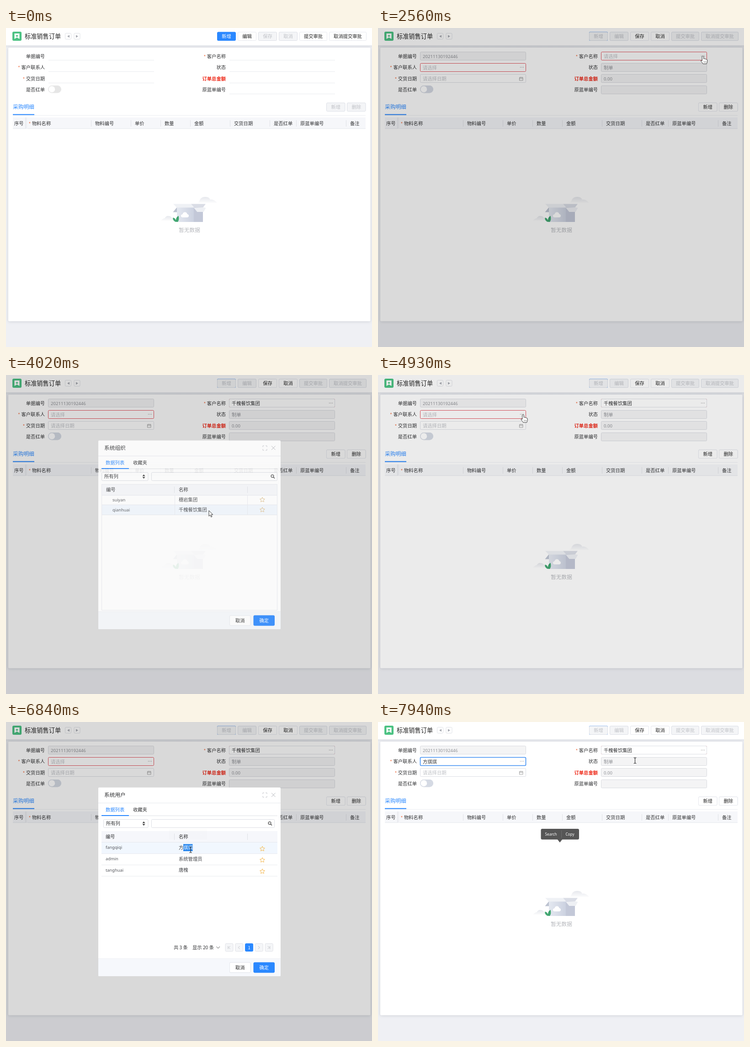
These frames come from a looping animation (801x699 px, 7990 ms). An HTML page:

```html
<!DOCTYPE html>
<html lang="zh-CN">
<head>
<meta charset="utf-8">
<style>
html, body { margin: 0; width: 100%; height: 100%; overflow: hidden; background: #eff0f4; }
svg { display: block; width: 801px; height: 699px; }
text { font-family: "Noto Sans CJK SC", "Noto Sans CJK", "Noto Sans", sans-serif; white-space: pre; }
text.latin { font-family: "Noto Sans", "Open Sans", sans-serif; }
.card { filter: drop-shadow(0 1px 3px rgba(40, 50, 70, .16)); }
</style>
</head>
<body>
<svg id="stage" viewBox="0 0 801 699" xmlns="http://www.w3.org/2000/svg"></svg>
<script>
const LOOP = 7990;
const BLUE = '#2a88ff', INK = '#303133', GREY = '#bfc1c6', LINE = '#e6e8ee', EDGE = '#dcdee4', RED = '#e2555f';
const ORG = '千槐餐饮集团', USER = '方琪琪';

// Drawing helpers
const box = (x, y, w, h, fill, stroke = 'none', r = 0, sw = 1) =>
  `<rect x="${x}" y="${y}" width="${w}" height="${h}" rx="${r}" fill="${fill}" stroke="${stroke}" stroke-width="${sw}"/>`;
const shape = (d, fill, stroke = 'none', sw = 1) =>
  `<path d="${d}" fill="${fill}" stroke="${stroke}" stroke-width="${sw}"/>`;
const line = (d, color, sw = 1) => shape(d, 'none', color, sw);
const text = (x, cy, s, { size = 10.3, fill = INK, anchor = 'start', weight = 400, latin = false } = {}) =>
  `<text x="${x}" y="${cy + size * .37}" font-size="${size}" fill="${fill}" text-anchor="${anchor}" font-weight="${weight}"${latin ? ' class="latin"' : ''}>${s}</text>`;
const group = (id, body, shown = true) => `<g id="${id}" opacity="${shown ? 1 : 0}">${body}</g>`;

const BUTTON = {
  normal: ['#fff', LINE, '#222'],
  off: ['#f4f5f7', '#dcdfe6', GREY],
  primary: [BLUE, BLUE, '#fff']
};
function button(x, y, w, h, label, kind) {
  const [bg, edge, ink] = BUTTON[kind];
  return box(x + .5, y + .5, w - 1, h - 1, bg, edge, 2) +
    text(x + w / 2, y + h / 2, label, { fill: ink, anchor: 'middle' });
}

const dots = (x, y) => [-3.3, 0, 3.3].map(d => `<circle cx="${x + d}" cy="${y}" r=".8" fill="#999"/>`).join('');
function star(x, y, color) {
  const pts = [...Array(10)].map((_, i) => {
    const a = i * Math.PI / 5 - Math.PI / 2, r = i % 2 ? 2.7 : 5.6;
    return (x + r * Math.cos(a)).toFixed(2) + ',' + (y + r * Math.sin(a)).toFixed(2);
  });
  return `<polygon points="${pts.join(' ')}" fill="none" stroke="${color}" stroke-linejoin="round"/>`;
}

// Page
const LEFT = 92, RIGHT = 488;
const rowY = i => 52 + i * 24.6;

function label(col, row, s, required) {
  const x = col === LEFT ? 85 : 481, cy = rowY(row) + 9.8;
  return text(x, cy, s, { anchor: 'end' }) +
    (required ? text(x - s.length * 10.3 - 5, cy + 1, '*', { fill: '#f06a3c', anchor: 'middle' }) : '');
}

function field(col, row, value, kind, icon = '') {
  const off = kind === 'off', y = Math.round(rowY(row));
  const edge = { off: '#d9dbe0', error: RED, focus: '#3c8df2' }[kind] || EDGE;
  const fill = off ? '#8f9196' : kind === 'error' || kind === 'hint' ? GREY : INK;
  const latin = /^\d/.test(value);
  return box(col + .5, y + .5, 231, 18, off ? '#f4f4f5' : '#fff', edge, 2, kind === 'focus' ? 1.6 : 1) +
    text(col + 6, y + 10.2, value, { fill, latin, size: latin ? 9.6 : 10.3 }) + icon;
}

function topBar() {
  const arrow = (x, d) => box(x + .5, 11.5, 13, 13, '#fff', '#dfe1e6', 2) + shape(d, '#a9acb3');
  return box(0, 0, 801, 38, '#fff') + box(0, 38, 801, 6, 'url(#fade)') +
    box(14, 8, 20, 20, '#4cc283', 'none', 3) +
    shape('M18.5 12h11v12l-5.5-3.2-5.5 3.2z', '#fff') +
    shape('M24 14.2l.9 1.9 2 .2-1.5 1.4.4 2-1.8-1-1.8 1 .4-2-1.5-1.4 2-.2z', '#4cc283') +
    text(41, 18, '标准销售订单', { size: 13.2, fill: '#222' }) +
    arrow(129, 'M134 18.2l5-3v6z') + arrow(148.5, 'M158 18.2l-5-3v6z');
}

const TOP_BUTTONS = [[462, 41, '新增'], [507, 41, '编辑'], [552, 41, '保存'], [597, 41, '取消'], [642, 61, '提交审批'], [707, 82, '取消提交审批']];
function buttons(editing) {
  const top = TOP_BUTTONS.map(([x, w, s], i) => {
    const on = (i === 2 || i === 3) === editing;
    return button(x, 8.5, w, 19.5, s, !on ? 'off' : i ? 'normal' : 'primary');
  }).join('');
  const kind = editing ? 'normal' : 'off';
  return top + button(701, 163.5, 41.5, 19.5, '新增', kind) + button(746, 163.5, 41.5, 19.5, '删除', kind);
}

const toggle = bg => box(92, 126, 29, 16.5, bg, 'none', 8.2) + `<circle cx="100.3" cy="134.2" r="6.9" fill="#fff"/>`;

function labels() {
  return label(LEFT, 0, '单据编号') + label(LEFT, 1, '客户联系人', true) + label(LEFT, 2, '交货日期', true) +
    label(LEFT, 3, '是否红单') + label(RIGHT, 0, '客户名称', true) + label(RIGHT, 1, '状态') +
    text(481, 111, '订单总金额', { fill: '#ee2413', anchor: 'end', weight: 700 }) + label(RIGHT, 3, '原蓝单编号');
}

function detailTable() {
  const heads = [[18, '序号'], [57, '物料名称'], [195, '物料编号'], [282, '单价'], [347, '数量'], [412, '金额'],
    [499, '交货日期'], [586, '是否红单'], [644, '原蓝单编号'], [753, '备注']];
  return text(15, 173, '采购明细', { size: 11.7, fill: BLUE }) +
    line('M15 191.5H787', '#eceef2') + box(15, 188.7, 47, 2, BLUE) +
    box(15, 196, 772, 25, '#f6f7fa') + line('M15 220.5H787', LINE) + box(42, 196, 5, 25, 'url(#side)') +
    heads.map(([x, s], i) => text(x, 209, s) + (i > 1 ? line(`M${x - 8.5} 202v14`, '#dfe1e6') : '')).join('') +
    text(52, 210, '*', { fill: '#f06a3c', anchor: 'middle' });
}

function emptyState() {
  return shape('M418 383q5-1 6-6 3-7 12-7 9 0 11 6 7-2 15 7z', 'url(#cloud)') +
    shape('M339 422q5-5 8-5 4-6 9-5 5 0 8 5l5 5z', 'url(#cloud)') +
    shape('M374 393l-8.5 10.5h8.5z', '#bcc2d0') +
    box(374, 392, 38, 33, 'url(#front)') + box(411, 392, 20, 33, '#c3c8d8') +
    shape('M366 385.5h39l7 8h-38z', '#eff1f5') +
    shape('M405 385.5h32l-6 8h-19z', '#dadde6') +
    shape('M411 394l20-1 6.500 1-5 9h-14z', '#eef0f4') +
    shape('M386 415q-4-1-3-4.500 1-2.500 3.500-2.500 1-4.500 5-4.500 4 0 5 4 3.500 1 3.500 4 0 3-3 3.500z', '#fff') +
    shape('M370 424.500q-6-4-4.500-9 5 1 6.500 6 0-7 5.500-10 2.500 8-1.500 13.500z', '#43a873') +
    line('M372.500 424q0-6 4-10', '#2c8a59', .7) +
    text(401.5, 442.5, '暂无数据', { size: 11.7, fill: '#b6b8bd', anchor: 'middle' });
}

const blankForm = [LEFT, RIGHT].map(x => [70.5, 95.5, 120.5, 144.5].slice(0, x === LEFT ? 3 : 4)
  .map(y => line(`M${x + 1} ${y}h231`, '#e9ebef')).join('')).join('');
const calendar = line('M309.500 108.500h7.500v6.500h-7.500zM309.500 110.800h7.500M311.500 107v2M315 107v2', '#999', .9);
const editForm = field(LEFT, 0, '20211130192446', 'off') + field(LEFT, 2, '请选择日期', 'hint', calendar) +
  field(RIGHT, 1, '制单', 'off') + field(RIGHT, 2, '0.00', 'off') + field(RIGHT, 3, '', 'off') +
  field(RIGHT, 0, '请选择', 'error', dots(711, 61.5)) + field(LEFT, 1, '请选择', 'error', dots(315, 86));

// Dialogs
function dialog(title, wide, body) {
  const x = wide ? 209.5 : 213.5, end = wide ? 593.5 : 587.5, glass = end - 10;
  return box(202, 143.5, 399, 413.5, '#fff', 'none', 2) +
    text(215, 160, title, { size: 11.7 }) + line('M202 177.500h399', LINE) +
    line('M562 158v-3h3M568 155h3v3M571 162v3h-3M565 165h-3v-3', '#c3c5ca', .9) +
    line('M581 155.500l8.500 8.500M589.500 155.500l-8.500 8.500', '#b4b6bb') +
    line('M209 205.500h385', '#dfe1e6') + box(209, 204, 60, 2, BLUE) +
    text(218, 192, '数据列表', { fill: BLUE }) + text(278, 192, '收藏夹') +
    box(x, 213.5, 311 - x, 18, '#fff', EDGE, 2) + text(x + 5.5, 222.5, '所有列') +
    shape('M298.500 221.500l3-3.500 3 3.500zM298.500 223.500l3 3.500 3-3.500z', '#333') +
    box(318.5, 213.5, end - 318.5, 18, '#fff', EDGE, 2) +
    `<circle cx="${glass - .5}" cy="221.500" r="2.900" fill="none" stroke="#444" stroke-width="1.200"/>` +
    line(`M${glass + 1.7} 223.700l2.800 2.800`, '#444', 1.5) +
    box(209, 239, 385, 24, '#f6f7fb') + line('M209 263.500h385', LINE) +
    text(wide ? 219 : 218, 251.5, '编号') + text(378, 251.5, '名称') +
    line('M368.500 244.500v14M528.500 244.500v14', '#dfe1e6') +
    body + box(202, 518, 399, 39, '#f6f8fc', 'none', 2) + line('M202 518.500h399', '#eef0f4');
}

const footer = off => button(489, 526.5, 46.5, 23, '取消', off ? 'off' : 'normal') +
  button(541.5, 526.5, 46.5, 23, '确定', off ? 'off' : 'primary');

const entry = (x, y, code, name, starY, color) =>
  text(x, y, code, { size: 9.3, latin: true, fill: '#55575c' }) + text(378, y, name, { fill: '#44464a' }) + star(561, starY, color);

function orgDialog() {
  return dialog('系统组织', true,
    group('orgHover', box(210, 285, 383, 21.5, '#f1f7fe'), false) +
    line('M209.500 239.500h384v276h-384zM209.500 284.500h384M209.500 306.500h384M369.500 263v43M528.500 263v43', '#e8eaef') +
    entry(233, 273.5, 'suiyan', '穗岩集团', 273.5, '#dfc08c') +
    entry(233, 295.5, 'qianhuai', ORG, 295.5, '#dfc08c'));
}

function pager() {
  const marks = ['M486 491v6.500M490.500 491l-3 3.200 3 3.200', 'M511.500 491l-3 3.200 3 3.200', '', 'M552 491l3 3.200-3 3.200', 'M573 491l3 3.200-3 3.200M577.500 491v6.500'];
  return text(367, 494, '共 3 条') + text(408, 494, '显示 20 条') + line('M460.500 492l3.700 4 3.700-4', '#555') +
    marks.map((d, i) => {
      const on = i === 2, x = 480 + i * 21.8;
      return box(x, 485.5, 17, 17, on ? BLUE : '#f5f6f8', on ? BLUE : '#e0e2e7', 2) +
        (on ? text(x + 8.5, 494, '1', { size: 9.6, fill: '#fff', anchor: 'middle' }) : line(d, GREY));
    }).join('');
}

function userDialog() {
  const people = [['fangqiqi', USER], ['admin', '系统管理员'], ['tanghuai', '唐槐']];
  return dialog('系统用户', false,
    group('userHover', box(209, 264, 385, 25, '#f1f7fe'), false) +
    people.map(([code, name], i) => {
      const y = 275 + i * 24.7;
      return entry(218, y, code, name, y + 3, '#f5b74e') + line(`M209 ${288.5 + i * 24.7}h385`, '#e8eaef');
    }).join('') +
    group('picked', box(388, 267.5, 20.5, 15.5, '#2a88ee') + text(388.3, 275, USER.slice(1), { fill: '#fff' }), false) +
    pager());
}

const popup = box(356.5, 234, 83.5, 23.5, '#565656', 'none', 3) + shape('M392.500 257h11l-5.500 7z', '#565656') +
  line('M401.500 238v15.500', '#6d6d6d') +
  [[378.5, 'Search'], [420, 'Copy']].map(([x, s]) =>
    text(x, 245.5, s, { size: 8.2, fill: '#fff', anchor: 'middle', latin: true })).join('');

const pointers = {
  arrow: shape('M0 0v12.300l2.900-2.600 2 4.600 2-.9-2-4.400h3.900z', '#fff', '#222', .9),
  hand: shape('M-1.700 1.300q1.700-2.200 3.400 0v5q1.900-1 3 .6 1.700-.8 2.700.9 1.800-.5 2.200 1.500v3.500q-.2 2.200-1.500 4.700h-7.800q-1.200-2.300-4.800-6.300-.2-2 2.800-.7z', '#fff', '#222', .9) +
    line('M4.500 12v3M6.800 12v3M2.300 12v3', '#555', .7),
  beam: line('M-2.800-6.300q2.300 0 2.800 1 .5-1 2.800-1M0-5.500v11M-2.800 6.300q2.300 0 2.800-1 .5 1 2.800 1', '#222', 1.1)
};

const gradient = (id, dir, a, b) => `<linearGradient id="${id}" x1="0" y1="0" x2="${dir === 'x' ? 1 : 0}" y2="${dir === 'y' ? 1 : 0}">` +
  `<stop stop-color="${a}"/><stop offset="1" stop-color="${b}"/></linearGradient>`;

document.getElementById('stage').innerHTML =
  '<defs>' + gradient('fade', 'y', '#e3e5ea', '#eff0f4') + gradient('side', 'x', '#e6e8ed', '#f6f7fa') +
  gradient('cloud', 'y', '#e6e8ed', '#fbfbfc') + gradient('front', 'x', '#e4e8f0', '#cbd1e0') + '</defs>' +
  box(0, 0, 801, 699, '#eff0f4') + topBar() +
  `<g class="card">${box(5, 43, 792.5, 599.5, '#fff', 'none', 2)}</g>` +
  labels() + detailTable() + emptyState() +
  group('blank', blankForm) + group('form', editForm, false) +
  group('org', field(RIGHT, 0, ORG, 'plain', dots(711, 61.5)), false) +
  group('user', field(LEFT, 1, USER, 'focus', dots(315, 86)), false) +
  toggle('#e6e6e6') + group('toggleOn', toggle('#d5dae4'), false) +
  buttons(false) +
  group('hover', box(462, 8.5, 41, 19.5, '#5aa2ff', 'none', 2) + text(482.5, 18.25, '新增', { fill: '#fff', anchor: 'middle' }), false) +
  group('press', box(462, 8.5, 41, 19.5, '#1c6fdc', 'none', 2) + text(482.5, 18.25, '新增', { fill: '#fff', anchor: 'middle' }), false) +
  group('editing', buttons(true), false) +
  group('mask', box(0, 0, 801, 699, '#000'), false) +
  group('orgDialog', orgDialog() + footer(false), false) +
  group('userDialog', userDialog() + footer(true) + group('ready', footer(false), false), false) +
  group('popup', popup, false) +
  Object.keys(pointers).map(k => group(k, pointers[k], false)).join('');

// Motion
const ramp = (t, a, b) => Math.min(1, Math.max(0, (t - a) / (b - a)));
const ease = p => p * p * (3 - 2 * p);
const during = (t, a, b) => t >= a && t < b ? 1 : 0;
const show = (id, v) => document.getElementById(id).setAttribute('opacity', v);

// start, end, x, y, resting pointer
const moves = [
  [200, 200, 670, 126, 'arrow'], [200, 600, 472, 16, 'hand'], [1710, 2160, 711, 61, 'hand'],
  [2960, 3420, 444, 297, 'arrow'], [4170, 4670, 317.5, 86.5, 'hand'], [5740, 6290, 398, 279, 'beam'],
  [6440, 6490, 404, 280, 'beam'], [6990, 7440, 587, 122, 'arrow'], [7490, 7740, 574, 86, 'beam'],
  [7890, 7940, 562.5, 84.5, 'beam']
];

function movePointer(t) {
  const i = moves.findLastIndex(m => t >= m[0]);
  let kind = '';
  if (i >= 0) {
    const [a, b, x, y, rest] = moves[i], [, , px, py, was] = moves[Math.max(0, i - 1)];
    const p = b > a ? ease(ramp(t, a, b)) : 1;
    kind = p > .92 ? rest : p < .05 || was === rest && b - a < 100 ? was : 'arrow';
    document.getElementById(kind).setAttribute('transform', `translate(${px + (x - px) * p} ${py + (y - py) * p})`);
  }
  for (const k in pointers) show(k, k === kind ? 1 : 0);
}

function render(t) {
  const edit = ramp(t, 1480, 1710), filled = during(t, 1460, LOOP);
  show('blank', 1 - filled);
  show('form', filled);
  show('org', during(t, 4020, LOOP));
  show('user', during(t, 7040, LOOP));
  show('hover', ramp(t, 500, 600));
  show('press', .6 * ramp(t, 830, 900) * (1 - ramp(t, 930, 1050)));
  show('editing', edit);
  show('toggleOn', edit);
  show('mask', .15 * (ease(ramp(t, 2230, 2610)) - ramp(t, 4020, 4220) + ease(ramp(t, 4750, 5100)) - ramp(t, 7040, 7240)));
  show('orgDialog', during(t, 2810, LOOP) * (1 - ramp(t, 4000, 4170)));
  show('userDialog', during(t, 5640, LOOP) * (1 - ramp(t, 7020, 7190)));
  show('orgHover', during(t, 3370, LOOP));
  show('userHover', during(t, 6220, LOOP));
  show('ready', during(t, 5840, LOOP));
  show('picked', during(t, 6690, LOOP));
  show('popup', ramp(t, 6840, 6990));
  movePointer(t);
}

const start = performance.now();
function tick() {
  render((performance.now() - start) % LOOP);
  requestAnimationFrame(tick);
}
tick();
</script>
</body>
</html>
```
